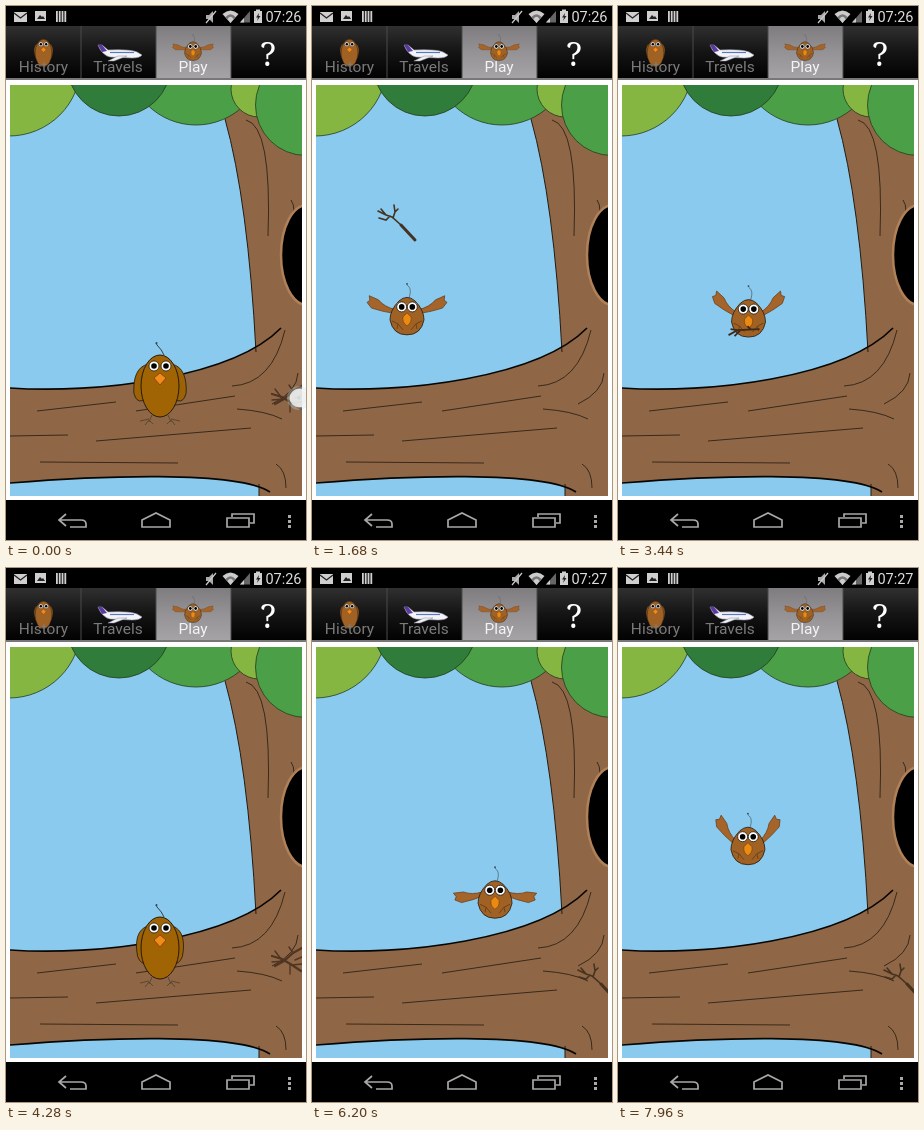
Write an HTML page with a canvas that moves like this. It is 300x534 px and loops after 8000 ms.

```html
<!DOCTYPE html>
<html lang="en">
<head>
<meta charset="utf-8">
<title>Bird game</title>
<style>
html, body { margin: 0; width: 100%; height: 100%; overflow: hidden; background: #000; }
canvas { display: block; width: 100%; height: 100%; }
</style>
</head>
<body>
<canvas id="stage" width="300" height="534"></canvas>
<script>
const ctx = document.getElementById('stage').getContext('2d');
const LOOP = 8000;
const INK = '#241a10', BARK = '#8f6746';
const LIGHT = '#86b642', MID = '#4ba047', DARK = '#2f7c3b';

// Flights: [time, x, y]; between flights the bird sits on the branch.
const flights = [
  [[1370, 154, 378], [1680, 95, 310], [2470, 95, 215], [2640, 102, 232], [4100, 154, 378]],
  [[5080, 154, 378], [5440, 213, 283], [5480, 213, 283], [6900, 154, 378]],
  [[7600, 154, 378], [7960, 130, 278], [8080, 122, 243]]
];
// Perched wing flutter before each take-off: [start, end, phase shift]
const flutters = [[0, 1370, 0.13], [4500, 5080, 0], [6920, 7600, 0.17]];

const lerp = (a, b, k) => a + (b - a) * k;
const clamp = k => Math.max(0, Math.min(1, k));

function shape(d, fill, stroke, width = 1) {
  const path = new Path2D(d);
  if (fill) { ctx.fillStyle = fill; ctx.fill(path); }
  if (stroke) { ctx.strokeStyle = stroke; ctx.lineWidth = width; ctx.stroke(path); }
}
function oval(x, y, rx, ry, fill, stroke, width = 1) {
  ctx.beginPath();
  ctx.ellipse(x, y, rx, ry, 0, 0, Math.PI * 2);
  if (fill) { ctx.fillStyle = fill; ctx.fill(); }
  if (stroke) { ctx.strokeStyle = stroke; ctx.lineWidth = width; ctx.stroke(); }
}
function rect(x, y, w, h, fill) {
  ctx.fillStyle = fill;
  ctx.fillRect(x, y, w, h);
}
function text(str, x, y, font, fill, align = 'center') {
  ctx.font = font;
  ctx.textAlign = align;
  ctx.fillStyle = fill;
  ctx.fillText(str, x, y);
}
function at(x, y, draw, scale = 1, angle = 0) {
  ctx.save();
  ctx.translate(x, y);
  ctx.rotate(angle);
  ctx.scale(scale, scale);
  draw();
  ctx.restore();
}
function mirrored(draw) {
  for (const side of [1, -1]) {
    ctx.save();
    ctx.scale(side, 1);
    draw();
    ctx.restore();
  }
}

function eyes(y, gap) {
  for (const x of [-gap, gap]) {
    oval(x, y, 5, 5, '#fff', INK, .8);
    oval(x, y, 2.8, 2.8, '#000');
  }
}

// Origin is the body centre; open is the wing angle in radians.
function perchedBird(open, wing = '#9c6204', body = '#a06404') {
  shape('M-8 29L-11 36M-11 33L-20 35M-11 34L-15 39M-11 34L-7 38M8 29L11 36M11 33L20 35M11 34L15 39M11 34L7 38', null, '#5b4630');
  shape('M4-31Q2-36-3-41L-4-43', null, INK, .8);
  oval(-3.5, -43, 1, 1, '#345');
  mirrored(() => at(-14, -19, () =>
    shape('M2-3C-9 0-12 12-10 27Q-7 36-1 34L4 28Q9 14 2-3Z', wing, INK, .8), 1, open));
  oval(0, 0, 19, 31, body, INK);
  eyes(-20, 6);
  shape('M0-13L6-8L0-1L-6-8Z', '#f28a1c', '#7a3d00', .7);
}

function flyingBird(lift, carrying) {
  shape('M2-18C4-24 4-28 0-31', null, '#4a5a60', .7);
  oval(0, -32, .9, .9, '#345');
  mirrored(() => at(-14, -6, () =>
    shape('M2-1Q-9 0-17-5L-27-6L-25-2L-27 1L-21 5Q-9 5 2 3Z', '#a4642a', '#6a3f1c', .7), 1, lift));
  shape('M-8-15Q0-22 8-15Q17-6 17 4Q14 19 0 19Q-14 19-17 4Q-17-6-8-15Z', '#9f6124', INK, .8);
  shape('M-15 5L-9 8L-10 13M-9 8L-4 14M15 5L9 8L10 13M9 8L4 14', null, '#603b18', .8);
  eyes(-9, 5.3);
  shape('M0-3L4 1Q5 7 0 10Q-5 7-4 1Z', '#e88a14', '#7a3d00', .6);
  if (carrying) {
    shape('M11 11L-11 12L-20 17M-11 12L-18 11M-8 12L-14 18M2 11L-1 8', null, '#40291a', 1.8);
  }
}

function twig() {
  ctx.lineCap = 'round';
  shape('M18 18L4 3', null, '#45321f', 3);
  shape('M4 3L-5-5L-11-7L-19-11M-4-4L-2-10L-3-17M-7-6L-11-2L-18-4M-11-7L-16-13M-2-10L1-13', null, '#45321f', 1.6);
}
function nestTwigs() {
  ctx.lineCap = 'round';
  shape('M-15-4L-5-1L5 5L14 11M-12 6L-3 1L6-7L15-12', null, '#503522', 2.2);
  shape('M-6-1L-12-9M-3 1L-15 2M3 4L3 14M6-7L2-13M5 5L15 4M8 0L15-3', null, '#503522', 1.4);
}
function touchDot(x, y) {
  oval(x, y, 12, 12, 'rgba(190,225,245,.3)');
  oval(x, y, 9, 9, 'rgba(240,242,242,.86)', 'rgba(255,255,255,.6)');
  shape(`M${x - 2} ${y}h4M${x} ${y - 2}v4`, null, '#b9d4e4', .7);
}

function statusBar(clock) {
  const w = '#cfcfcf';
  rect(8, 6, 13, 10, w);
  shape('M8 7L14.5 12L21 7', null, '#222', 1.3);
  rect(29, 5, 11, 10, w);
  shape('M31 13L34 9L36 11L37 10L39 13Z', '#222');
  for (let i = 0; i < 4; i++) rect(50 + i * 2.8, 5, 1.8, 11, w);
  shape('M200 9h3l4-4v12l-4-4h-3Z', '#aaa');
  shape('M200 17L210 5', null, '#ccc', 1.2);
  for (const [rise, color] of [[0, '#ccc'], [3, '#777'], [5, '#ccc']]) {
    const half = 8 - rise;
    shape(`M${224.5 - half} ${8 + rise}Q224.5 ${1 + rise * 1.5} ${224.5 + half} ${8 + rise}L224.5 17Z`, color);
  }
  shape('M234 16.500L244 5V16.500Z', '#666');
  shape('M234 16.500L238 12V16.500Z', '#ccc');
  rect(248, 5, 8, 12, w);
  rect(250, 3.5, 4, 2, w);
  shape('M253 7L250 11.500H252L251 15L254.500 10H252.500Z', '#222');
  text(clock, 295.5, 15.5, '14.500px Roboto, sans-serif', '#ddd', 'right');
}

function tabs() {
  for (let i = 0; i < 4; i++) {
    const fill = ctx.createLinearGradient(0, 20, 0, 72);
    const active = i === 2;
    fill.addColorStop(0, active ? '#7e7c7f' : '#303030');
    fill.addColorStop(.5, active ? '#949295' : '#141414');
    fill.addColorStop(1, active ? '#a5a3a6' : '#020202');
    rect(i * 75, 20, 75, 52, fill);
    if (i) rect(i * 75 - .5, 20, 1, 52, '#4a4a4a');
  }
  at(37.5, 47, () => perchedBird(-.2, '#955a22', '#9f6124'), .44);
  // airliner
  shape('M92 39H96L102 44Q124 43 131 46L136 49Q134 52 126 52L104 51Q96 49 92 39Z', '#f4f4f8', '#9a9ab0', .6);
  shape('M92 39H96L101 45L96 46Z', '#5a3aa0');
  shape('M104 46.500H128', null, '#5878c0', 1.2);
  shape('M112 50H121L108 55H102Z', '#f0f0f4', '#8888a0', .5);
  at(187, 45, () => flyingBird(.08), .5);
  const font = '15.500px Roboto, sans-serif';
  text('History', 37.5, 66, font, '#7b7b7b');
  text('Travels', 112, 66, font, '#7b7b7b');
  text('Play', 187, 66, font, '#f4f4f4');
  text('?', 262, 60, '33px "Noto Serif", serif', '#fff');
}

function navBar() {
  rect(0, 494, 300, 40, '#000');
  const c = '#a8a8a8';
  shape('M60 508L53 514L60 520M53 514H75Q80 514 80 518V521H64', null, c, 1.7);
  shape('M136 514L150 507L164 514V521H136Z', null, c, 1.7);
  shape('M221 512H243V521H221ZM226 511V508H248V517H244', null, c, 1.7);
  for (const y of [510, 515, 520]) rect(282, y - 1, 3, 3, c);
}

function tree() {
  const top = 'M4 382C90 388 226 372 275 322';
  const bottom = '264 486C230 464 90 470 4 477';
  rect(4, 79, 292, 411, '#89caee');
  shape('M216 105L219 113Q242 195 250 346L253 478V490H296V79H216Z', BARK);
  shape(`${top}L290 400L${bottom}Z`, BARK);
  shape('M219 113Q242 195 250 346M253 478V490', null, INK, 1);
  shape(`${top}M${bottom}`, null, '#080604', 1.7);
  shape('M31 405L110 396M4 430L62 429M90 435L245 422M34 456L172 457M130 405L229 390' +
    'M231 403Q260 405 276 413M226 380Q266 378 279 324M266 398Q291 386 292 367' +
    'M270 458Q280 464 280 482M240 114Q266 120 262 230M285 194Q288 198 288 205', null, INK, .8);
  oval(301, 249, 26, 50, '#000', '#b08158', 2.5);
}
function leaves() {
  const leaf = (x, y, r, fill) => oval(x, y, r, r, fill, '#263a1c', .8);
  leaf(3, 58, 72, LIGHT);
  leaf(190, 50, 69, MID);
  leaf(113, 58, 52, DARK);
  leaf(253, 83, 28, LIGHT);
  leaf(300, 99, 50.5, MID);
}

function flightPosition(path, t) {
  const i = path.findIndex((p, n) => n && t <= p[0]);
  const [a, b] = [path[i - 1], path[i]];
  const k = (t - a[0]) / (b[0] - a[0]);
  return [lerp(a[1], b[1], k), lerp(a[2], b[2], k)];
}

function drawBird(t) {
  const path = flights.find(p => t >= p[0][0] && t < p[p.length - 1][0]);
  if (path) {
    const [x, y] = flightPosition(path, t);
    const degrees = 10 + 40 * Math.cos((t - 7960) / 239.5 * Math.PI * 2);
    at(x, y, () => flyingBird(degrees * Math.PI / 180, t >= 2470 && t < 4100));
    return;
  }
  const f = flutters.find(([a, b]) => t >= a && t < b);
  const phase = f ? (t - f[0]) / 240 + f[2] : 0;
  at(154, 380, () => perchedBird(-.06 + .84 * Math.sin(phase * Math.PI) ** 2));
}

function drawTwig(t, drag) {
  const nested = t < 120 || (t >= 4100 && t < 5060) || (t >= 6900 && t < 7600);
  if (nested) at(281, 392, nestTwigs);
  else if (t < 2470) at(lerp(281, 85, drag), lerp(392, 216, drag), twig);
  else if (t >= 5060) at(285, 413, twig);
}

function draw(t) {
  const k = clamp((t - 120) / 620);
  const drag = k * k * (3 - 2 * k);
  rect(0, 0, 300, 534, '#000');
  statusBar(t < 4640 ? '07:26' : '07:27');
  tabs();
  rect(0, 72, 300, 2, '#777');
  rect(0, 74, 300, 420, '#fff');
  ctx.save();
  ctx.beginPath();
  ctx.rect(4, 79, 292, 411);
  ctx.clip();
  tree();
  leaves();
  drawTwig(t, drag);
  drawBird(t);
  ctx.restore();
  if (t < 800) touchDot(lerp(293, 97, drag), lerp(392, 216, drag));
  if (t >= 6960 && t < 7120) touchDot(122, 243);
  navBar();
}

const start = performance.now();
function tick() {
  draw((performance.now() - start) % LOOP);
  requestAnimationFrame(tick);
}
tick();
</script>
</body>
</html>
```
